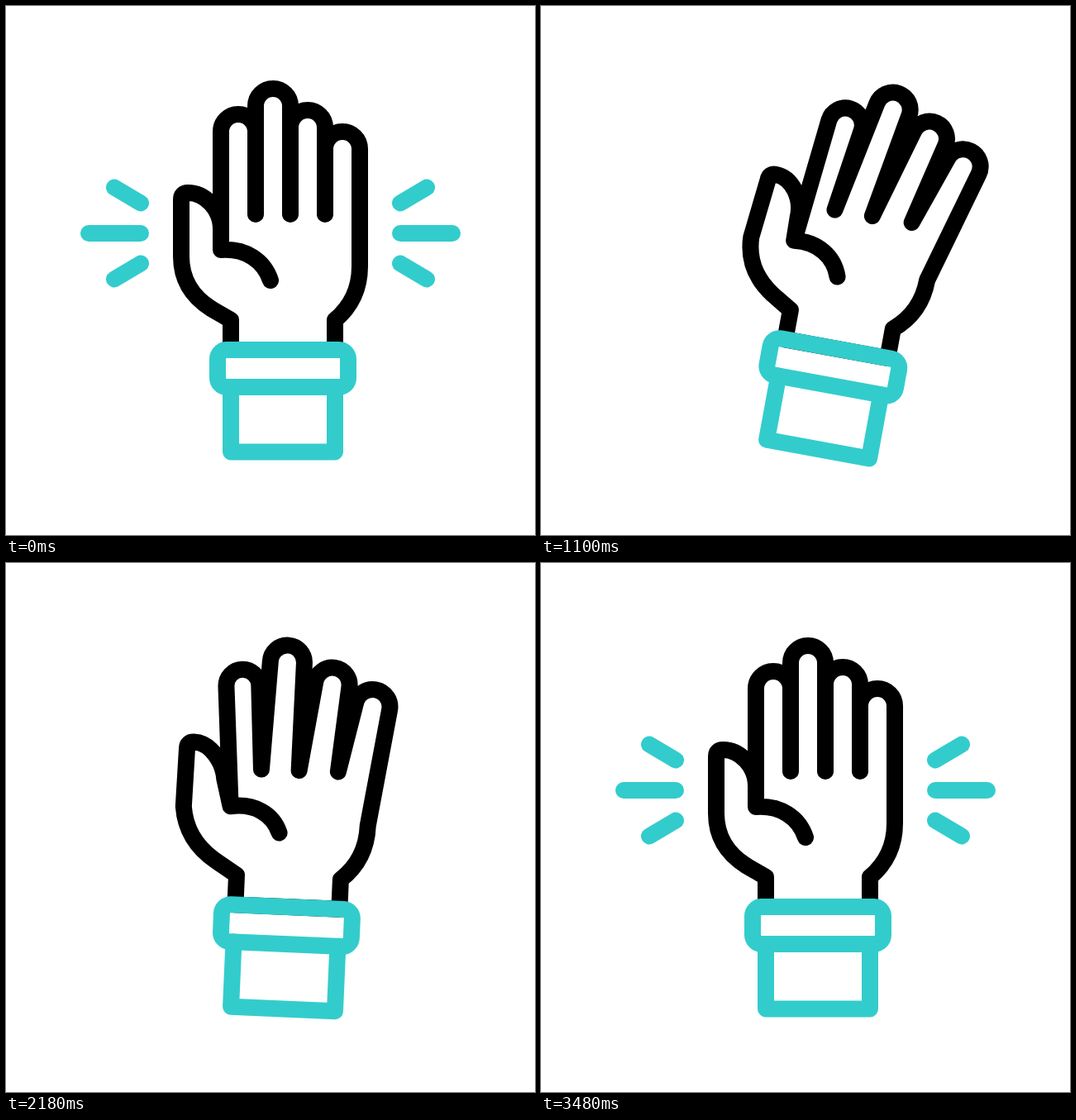
Animation, 640 px wide and 640 px high, one loop 3600 ms. Source, as an HTML page:

```html
<!DOCTYPE html>
<html lang="en">
<head>
<meta charset="utf-8">
<title>Waving hand</title>
<style>
  html, body { margin: 0; width: 100%; height: 100%; overflow: hidden; background: #fff; }
  svg { display: block; width: 100%; height: 100%; }
  path, rect { fill: none; stroke: #3cc; stroke-width: 20; stroke-linecap: round; stroke-linejoin: round; }
  #hand { stroke: #000; }
  #gaps { stroke: none; fill: #000; }
</style>
</head>
<body>
<svg viewBox="0 0 640 640">
  <path id="rays"/>
  <g id="arm">
    <path id="gaps"/>
    <path id="hand"/>
    <path d="M272,461V539.5H398V461"/>
    <rect x="256" y="416" width="158" height="45" rx="11"/>
  </g>
</svg>
<script>
const LOOP = 3600, BEAT = 400, SWINGS = 8;
const LEFT_ANGLE = -13.9, RIGHT_ANGLE = 14.8;
const DROP = 44, JUMP = -22;
const FINGER_TOPS = [152, 121, 147, 173];

const $ = id => document.getElementById(id);
const setPath = (id, d) => $(id).setAttribute('d', d);
const smooth = p => (p = Math.min(1, Math.max(0, p)), p * p * (3 - 2 * p));
const mix = (a, b, p) => a + (b - a) * p;

// One swing per beat; the first right pose pauses, then the hand jumps up faster.
function beatAt(t) {
  if (t < 500) return Math.min(t / BEAT, 1);
  if (t < 800) return 1 + (t - 500) / 300;
  return Math.min(t / BEAT, SWINGS);
}

function poseAt(t) {
  const beat = beatAt(t), n = Math.floor(beat), p = smooth(beat - n);
  const isLeft = k => +(k > 0 && k < SWINGS && k % 2 === 0);
  const isRight = k => k % 2;
  const height = k => k === 1 ? DROP : k === 2 ? JUMP : 0;
  const blend = value => mix(value(n), value(n + 1), p);
  return { left: blend(isLeft), right: blend(isRight), y: blend(height) };
}

function drawHand({ left, right, y }) {
  // A rest point with its shift in the left and in the right pose
  const at = (x, y, lx = 0, ly = 0, rx = 0, ry = 0) =>
    [x + left * lx + right * rx, y + left * ly + right * ry];

  const web = at(260, 295, 1, 4, 1, 1), edge = at(428, 315, 0, -3);
  const walls = [1, 2, 3].map(i => at(260 + 42 * i, 252, 3 * i - 22, -1, 3 + 1.4 * i * i, -i));
  const bases = [web, ...walls, edge];

  const fingers = FINGER_TOPS.map((top, i) => {
    const fade = 0.4 ** i, a = bases[i], b = bases[i + 1];
    const [x, y] = at(281 + 42 * i, top,
      -43 - 25.5 * Math.cos(1.05 * i - 0.15), 6 - 4.5 * i, 50.5 - 19.5 * fade, -6 * fade);
    const r = 21 - 2.5 * left * fade;
    const tilt = Math.atan2(x - (a[0] + b[0]) / 2, (a[1] + b[1]) / 2 - y);
    const dx = r * Math.cos(tilt), dy = r * Math.sin(tilt);
    return { r, a, b, from: [x - dx, y - dy], to: [x + dx, y + dy] };
  });

  const thumb = (x, y) => at(x, y, -30, -5, 11, -4);
  const palm = `M${edge}C428,342 417,364 398,380V416H272V380L${at(248, 366, -2, -3)}` +
    `C${at(226, 352, -4, -3)} ${at(212, 332, -10, -5)} ${at(212, 303, -18, -7)}` +
    `L${thumb(212, 234)}Q${thumb(212, 226)} ${thumb(220, 226)}` +
    `C${thumb(241, 226)} ${at(260, 246, -34, -2, 8)} ${at(260, 270, -25, -14, 5)}L${web}` +
    `C${at(290, 293, 0, -2)} ${at(312, 308, 2, -8)} ${at(320, 332, 3, -12)}`;

  setPath('hand', palm + fingers.map(({ r, a, b, from, to }) =>
    `M${a}L${from}A${r},${r} 0 0 1 ${to}L${b}`).join(''));
  setPath('gaps', walls.map((wall, i) =>
    `M${wall}L${fingers[i].to}L${fingers[i + 1].from}Z`).join(''));
  $('arm').setAttribute('transform',
    `translate(0 ${y}) rotate(${LEFT_ANGLE * left + RIGHT_ANGLE * right} 335 540)`);
}

function drawRays(t) {
  const grow = t < 400 ? 1 - smooth(t / 400) : smooth((t - 3080) / 400);
  const ray = (side, tilt) => {
    const dx = side * (tilt ? 32 : 63) * grow, dy = 19 * tilt * grow;
    return `M${320 + side * 157},${275 + 36.5 * tilt}l${dx},${dy}`;
  };
  setPath('rays', grow ? [-1, 1].map(side =>
    [-1, 0, 1].map(tilt => ray(side, tilt)).join('')).join('') : '');
}

function frame() {
  const t = performance.now() % LOOP;
  drawHand(poseAt(t));
  drawRays(t);
  requestAnimationFrame(frame);
}
frame();
</script>
</body>
</html>
```
